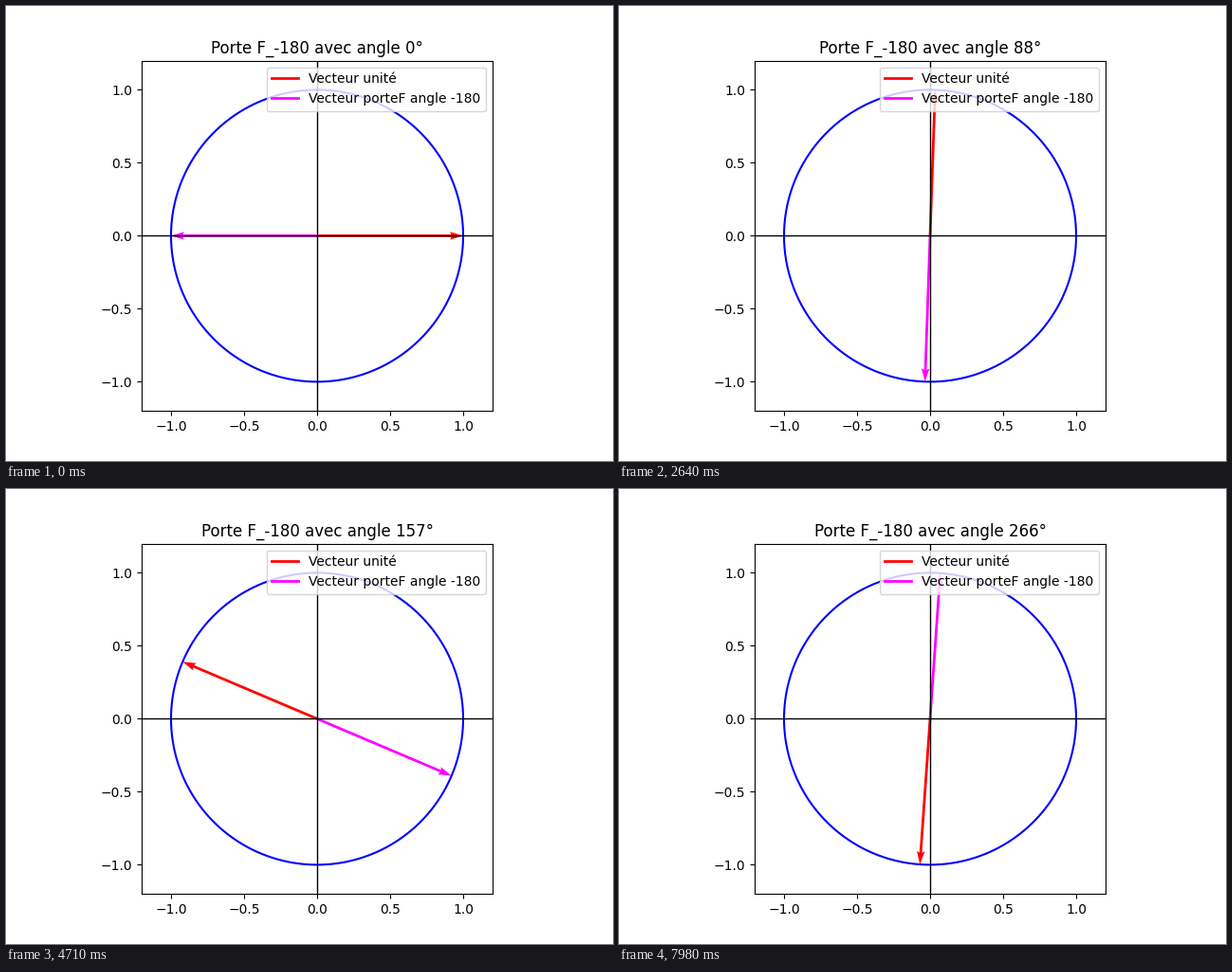
Recreate the animation shown at these times as a matplotlib script. Size 640 px wide and 480 px high, loop 8 s.

```python
import numpy as np
import matplotlib.pyplot as plt
from matplotlib.animation import FuncAnimation
from matplotlib.lines import Line2D

LOOP_MS = 8000
STEPS = 267          # one degree per step
GATE = -180          # phase added by the gate, in degrees

plt.rcParams["font.family"] = "DejaVu Sans"
fig, ax = plt.subplots(figsize=(6.4, 4.8), dpi=100)
ax.set_aspect("equal")
ax.set_xlim(-1.2, 1.2)
ax.set_ylim(-1.2, 1.2)
ticks = np.arange(-1, 1.1, 0.5)
ax.set_xticks(ticks)
ax.set_yticks(ticks)

turn = np.linspace(0, 2 * np.pi, 361)
ax.plot(np.cos(turn), np.sin(turn), color="blue", lw=1.5)
ax.axhline(0, color="black", lw=1)
ax.axvline(0, color="black", lw=1)


def unit(deg):
    a = np.radians(deg)
    return np.cos(a), np.sin(a)


def arrow(deg, color):
    return ax.quiver(0, 0, *unit(deg), color=color,
                     angles="xy", scale_units="xy", scale=1)


base = arrow(0, "red")
gated = arrow(GATE, "magenta")
title = ax.set_title("")

ax.legend(
    handles=[
        Line2D([], [], color="red", lw=2, label="Vecteur unité"),
        Line2D([], [], color="magenta", lw=2,
               label=f"Vecteur porteF angle {GATE}"),
    ],
    loc="upper right",
)


def update(deg):
    base.set_UVC(*unit(deg))
    gated.set_UVC(*unit(deg + GATE))
    title.set_text(f"Porte F_{GATE} avec angle {deg}°")
    return base, gated, title


anim = FuncAnimation(fig, update, frames=STEPS, interval=LOOP_MS / STEPS,
                     init_func=lambda: update(0), repeat=True,
                     repeat_delay=0, blit=False)

plt.show()
```
